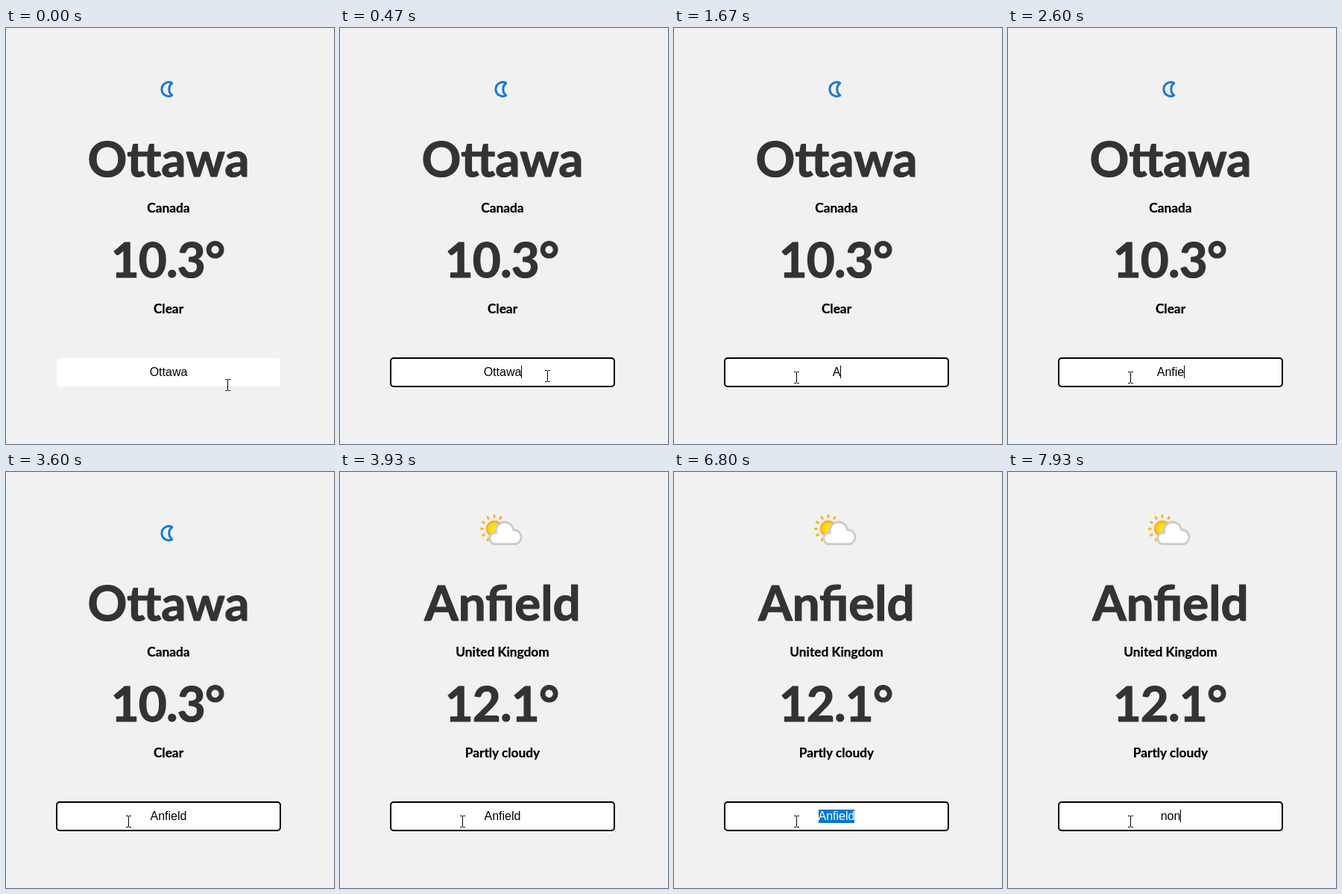
Write an HTML page that moves like this. It is 440 by 557 pixels and loops after 8000 ms.

```html
<!DOCTYPE html>
<html lang="en">
<head>
<meta charset="utf-8">
<title>Weather</title>
<style>
  html, body { margin: 0; width: 100%; height: 100%; overflow: hidden; background: #f1f1f1; }
  svg { display: block; width: 440px; height: 557px; }
  .big, .small { font-family: Lato, sans-serif; font-weight: 700; text-anchor: middle; stroke-linejoin: round; }
  .big { font-size: 65.5px; fill: #333; stroke: #333; stroke-width: 1.2px; }
  .small { font-size: 17.3px; fill: #000; stroke: #000; stroke-width: 0.25px; }
  #value { font: 16px "Liberation Sans", Arial, sans-serif; white-space: pre; }
</style>
</head>
<body>
<svg viewBox="0 0 440 557">
  <defs>
    <radialGradient id="sunFill">
      <stop offset="0.3" stop-color="#ffe51f"/>
      <stop offset="1" stop-color="#fcc419"/>
    </radialGradient>
  </defs>
  <rect width="440" height="557" fill="#f1f1f1"/>

  <path id="moon" d="M222.8 73.75 A9.4 9.4 0 1 0 222.8 90.25 A10.5 10.5 0 0 1 222.8 73.75Z"
    fill="#f1f1f1" stroke="#1579d8" stroke-width="3" stroke-linejoin="round"/>
  <g id="partly">
    <g id="rays" stroke="#f9b02b" stroke-width="2.8"></g>
    <circle cx="207" cy="76" r="10" fill="url(#sunFill)" stroke="#f9b02b" stroke-width="2.4"/>
    <path d="M207 96.5 A7.5 7.5 0 0 1 209.5 81.5 A11.7 11.7 0 1 1 232.5 77.5 A9.7 9.7 0 0 1 236 96.5Z"
      fill="#fff" stroke="#ccc" stroke-width="3" stroke-linejoin="round"/>
  </g>

  <text id="city" class="big" x="218" y="199"></text>
  <text id="country" class="small" x="218" y="247"></text>
  <text id="temp" class="big" x="217" y="333.5" letter-spacing="-0.8"></text>
  <text id="sky" class="small" x="218" y="382"></text>

  <rect id="field" x="68" y="442" width="300" height="38" rx="4" fill="#fff" stroke-width="2"/>
  <rect id="mark" y="452" height="18" fill="#0078d7"/>
  <text id="value" y="466"><tspan id="plain" fill="#000"></tspan><tspan id="picked" fill="#fff"></tspan></text>
  <rect id="caret" y="452" width="1" height="17" fill="#000"/>
  <path id="pointer" d="M-3 -7.5H0M1 -7.5H4M.5 -7V7M-3 7.5H0M1 7.5H4" fill="none" stroke="#000"/>
</svg>
<script>
const LOOP = 8000, MID = 218;
const $ = id => document.getElementById(id);
const show = (el, on) => el.setAttribute("visibility", on ? "visible" : "hidden");
const set = (el, attrs) => { for (const k in attrs) el.setAttribute(k, attrs[k]); };

const ctx = document.createElement("canvas").getContext("2d");
ctx.font = '16px "Liberation Sans", Arial, sans-serif';
const widthOf = s => ctx.measureText(s).width;

for (let i = 0; i < 12; i++) {
  const ray = document.createElementNS("http://www.w3.org/2000/svg", "line");
  set(ray, { x1: 14.5, x2: 19, transform: `translate(207 76) rotate(${i * 30})` });
  $("rays").append(ray);
}

const reports = [
  { city: "Ottawa", country: "Canada", temp: "10.3°", sky: "Clear" },
  { city: "Anfield", country: "United Kingdom", temp: "12.1°", sky: "Partly cloudy" }
];
const FOCUS = 400, DRAG = 530, REPORT = 3930, SELECT_ALL = 6800, RETYPE = 7670;

// [time, x, y]
const moves = [
  [0, 297, 478], [70, 295, 476], [130, 290, 472], [200, 284, 468], [270, 280, 466],
  [330, 278, 466], [530, 264, 466], [600, 228, 467], [670, 186, 468], [730, 164, 468]
];
// [time, text]
const typing = [
  [0, "Ottawa"], [1670, "A"], [1870, "An"], [2130, "Anf"], [2330, "Anfi"], [2600, "Anfie"],
  [3000, "Anfiel"], [3130, "Anfield"], [RETYPE, "n"], [7800, "no"], [7930, "non"]
];
const latest = (list, t) => list.filter(item => item[0] <= t).pop();

// Index of the letter gap nearest to x
function gapAt(text, x) {
  const gap = n => Math.abs(widthOf(text.slice(0, n)) - x);
  let best = 0;
  for (let i = 1; i <= text.length; i++) if (gap(i) < gap(best)) best = i;
  return best;
}

function draw(t) {
  const [, px, py] = latest(moves, t);
  const text = latest(typing, t)[1];
  const focused = t >= FOCUS;
  const later = t >= REPORT;

  const report = reports[+later];
  for (const id in report) $(id).textContent = report[id];
  show($("moon"), !later);
  show($("partly"), later);

  const width = widthOf(text), left = MID - width / 2;
  let from = text.length;
  if (t >= DRAG && t < typing[1][0]) from = gapAt(text, px - left);
  if (t >= SELECT_ALL && t < RETYPE) from = 0;
  const selected = from < text.length;

  set($("field"), { stroke: focused ? "#000" : "none" });
  $("plain").textContent = text.slice(0, from);
  $("picked").textContent = text.slice(from);
  set($("value"), { x: left });

  const start = Math.round(left + widthOf(text.slice(0, from)));
  show($("mark"), selected);
  set($("mark"), { x: start, width: Math.max(0, Math.round(left + width) - start) });

  const blinkOff = t >= 3596 && t < SELECT_ALL && Math.floor((t - 3596) / 533.5) % 2 === 0;
  show($("caret"), focused && !selected && !blinkOff);
  set($("caret"), { x: Math.floor(left + width) });
  set($("pointer"), { transform: `translate(${px} ${py})` });
}

function tick() {
  draw(performance.now() % LOOP);
  requestAnimationFrame(tick);
}
tick();
</script>
</body>
</html>
```
